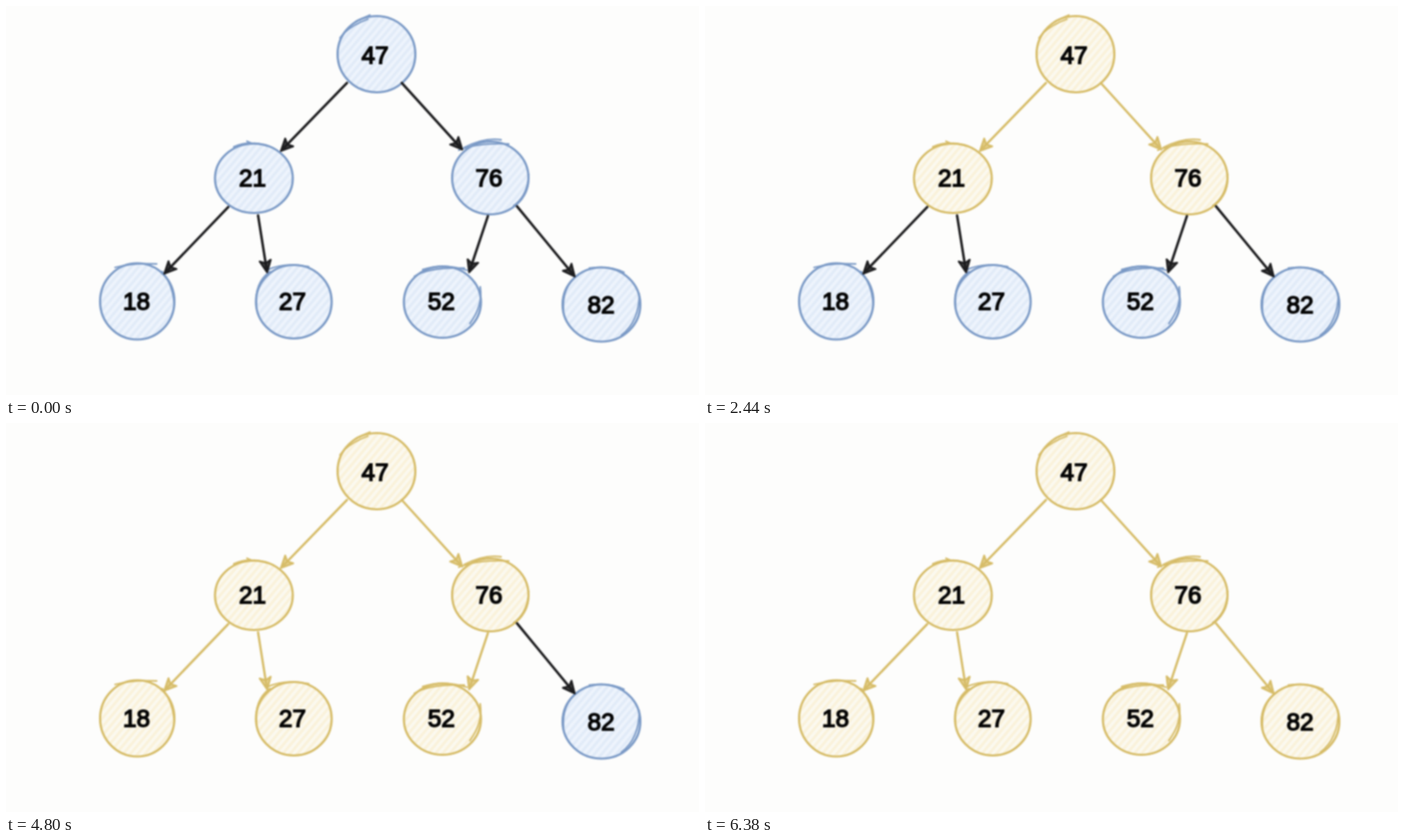
Recreate the animation shown at these times as an HTML page. Size 998x561 px, loop 6400 ms.

```html
<!DOCTYPE html>
<html lang="en">
<head>
<meta charset="utf-8">
<title>Breadth-first tree walk</title>
<style>
  html, body { margin: 0; width: 100%; height: 100%; overflow: hidden; background: #fdfdfc; }
  svg { display: block; width: 100vw; height: 100vh; }
  #tree { filter: blur(.8px); }
  path, ellipse { stroke-linecap: round; stroke-linejoin: round; }
  .node { fill: url(#blue); stroke: #7b9ac6; stroke-width: 3.2; }
  .node path { fill: none; stroke-width: 2.3; }
  .edge { fill: none; stroke: #1c1c1e; stroke-width: 3.6; }
  .edge .head { fill: #444; stroke-width: 2.8; }
  .on .node { fill: url(#gold); stroke: #d6bc68; }
  .on .edge { stroke: #d6bc68; stroke-width: 3.3; }
  .on .edge .head { fill: #e6d294; stroke-width: 2.8; }
  text { font: 35px "Liberation Sans", Arial, sans-serif; text-anchor: middle; fill: #050505; stroke: #050505; stroke-width: 1.9; }
</style>
</head>
<body>
<svg viewBox="0 0 998 561" preserveAspectRatio="none">
  <defs>
    <pattern id="blue" width="8" height="8" patternUnits="userSpaceOnUse" patternTransform="rotate(40)">
      <rect width="8" height="8" fill="#eef4fc"/><rect x="2" width="4" height="8" fill="#e1ebf8"/>
    </pattern>
    <pattern id="gold" width="8" height="8" patternUnits="userSpaceOnUse" patternTransform="rotate(40)">
      <rect width="8" height="8" fill="#fbf9f0"/><rect x="2" width="4" height="8" fill="#faf2da"/>
    </pattern>
  </defs>
  <g id="tree"></g>
</svg>
<script>
const LOOP = 6400, FADE = 280;

// at: visit time; box: cx, cy, rx, ry; label: x, y; edge: from x, y, to x, y; sketch: loose pen strokes
const nodes = [
  { value: 47, at: 400, box: [533.5, 69.5, 56, 55], label: [531.5, 70],
    sketch: 'M481 46Q492 30 521 19M504 22L524 13' },
  { value: 21, at: 938, box: [357, 248.5, 56, 50], label: [355, 247], edge: [491, 111, 396, 209],
    sketch: 'M328 203Q352 193 376 202M347 195L354 198' },
  { value: 76, at: 1800, box: [697.5, 248, 55, 52.5], label: [695.5, 247.5], edge: [570, 111, 657, 207],
    sketch: 'M652 208Q680 197 724 199M660 204Q690 189 713 193M753 243Q751 274 731 288' },
  { value: 18, at: 3818, box: [189, 426, 53.5, 55], label: [188, 425.5], edge: [320, 290, 228, 386],
    sketch: 'M157 377Q186 370 217 372M225 383Q240 402 242 428' },
  { value: 27, at: 4150, box: [414.5, 426.5, 54.5, 53], label: [412.5, 425], edge: [363, 302, 376, 384],
    sketch: 'M361 432Q357 400 380 383M376 381Q400 369 436 376' },
  { value: 52, at: 4480, box: [628.5, 427, 55.5, 51.5], label: [627, 425], edge: [694, 303, 667, 384],
    sketch: 'M588 390Q610 376 660 378M600 380Q630 371 664 381M683 405Q687 432 668 458' },
  { value: 82, at: 4860, box: [857.5, 430.5, 56, 53.5], label: [857, 430], edge: [736, 289, 819, 390],
    sketch: 'M803 440Q800 405 824 388M840 378Q870 374 890 384M912 415Q912 455 886 475' }
];

function add(parent, tag, attrs) {
  const el = document.createElementNS('http://www.w3.org/2000/svg', tag);
  for (const key in attrs) el.setAttribute(key, attrs[key]);
  return parent.appendChild(el);
}

function drawEdge(parent, [x1, y1, x2, y2]) {
  const g = add(parent, 'g', { class: 'edge' });
  const angle = Math.atan2(y2 - y1, x2 - x1);
  const back = (length, side) =>
    `${x2 - length * Math.cos(angle) - side * Math.sin(angle)} ${y2 - length * Math.sin(angle) + side * Math.cos(angle)}`;
  add(g, 'path', { class: 'head', d: `M${x2} ${y2}L${back(17, 8)}L${back(13, 0)}L${back(17, -8)}Z` });
  add(g, 'path', { d: `M${x1} ${y1}L${back(3, 0)}` });
}

function drawNode(parent, { box: [cx, cy, rx, ry], sketch }) {
  const g = add(parent, 'g', { class: 'node' });
  add(g, 'ellipse', { cx, cy, rx, ry });
  add(g, 'path', { d: sketch });
}

const tree = document.getElementById('tree');
for (const node of nodes) {
  node.group = add(tree, 'g', {});
  drawNode(node.group, node);
  if (node.edge) drawEdge(node.group, node.edge);
  node.text = add(node.group, 'text', { x: node.label[0], y: node.label[1] + 12.5 });
  node.text.textContent = node.value;
}

const start = performance.now();
function render() {
  const time = (performance.now() - start) % LOOP;
  for (const { at, group, text } of nodes) {
    const visited = time >= at;
    group.setAttribute('class', visited ? 'on' : '');
    text.setAttribute('opacity', visited ? Math.min(1, (time - at) / FADE) : 1);
  }
  requestAnimationFrame(render);
}
render();
</script>
</body>
</html>
```
